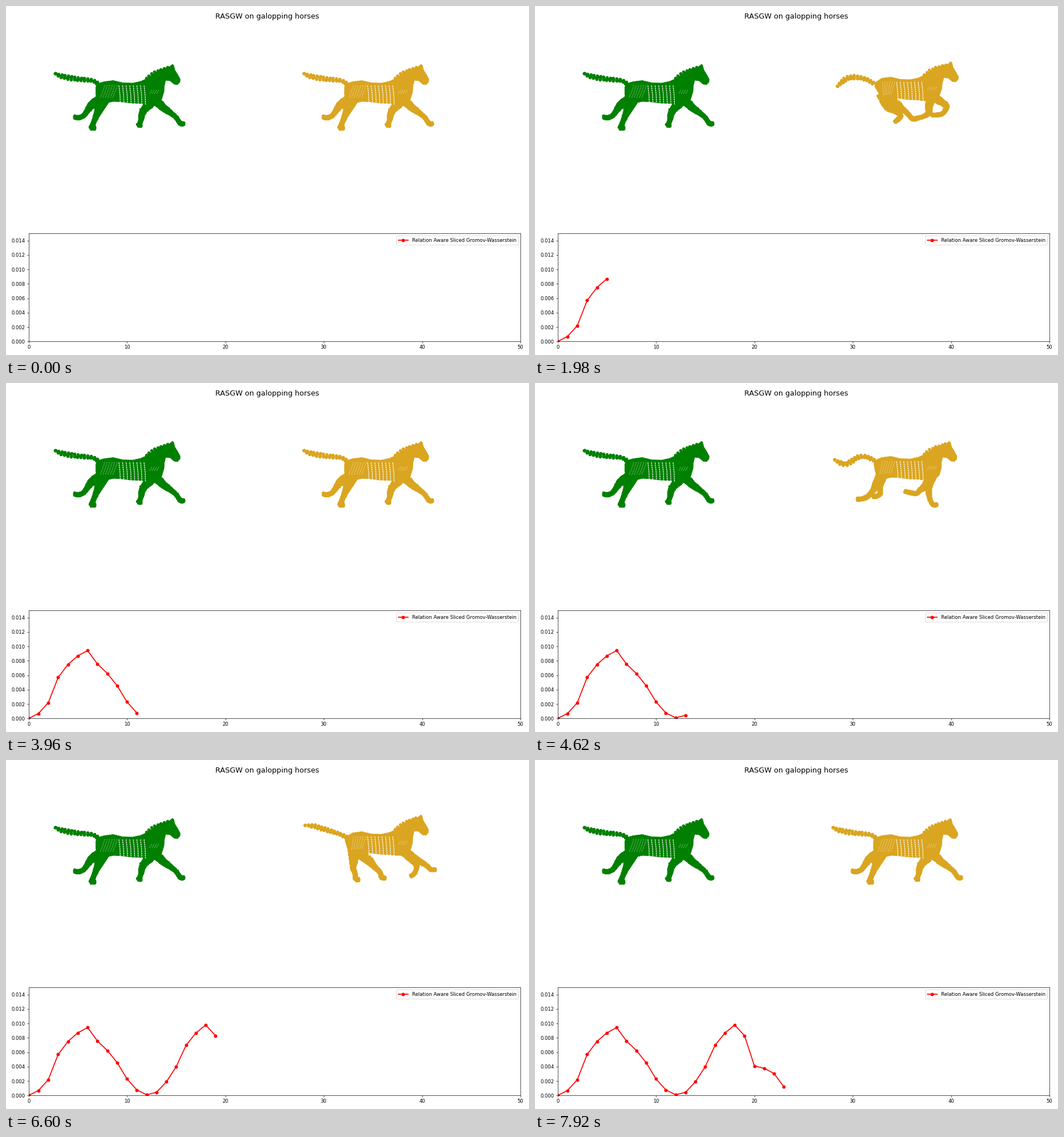
Animation of 917x611 px, one loop 8 s. Source, as a matplotlib script:

```python
import numpy as np
import matplotlib.pyplot as plt
from matplotlib.animation import FuncAnimation

W, H, DPI = 917, 611, 61.13
LOOP, TICK, HOLD = 8000, 20, 330
DOT = 5.5          # dot diameter in pixels
SHIFT = 436        # distance between the two horses
PT = 72 / DPI      # points per pixel

# Each pose: (body dy, head dx, head dy, rump tuck), tail, then
# both hind and both front legs from stifle or elbow to hoof tip.
POSES = {
    "A": [(0, 0, 0, 0),
          (522.5, 118, 531, 122, 545, 125, 558, 127, 572, 128.5, 587, 130, 600, 137),
          (588, 171, 578, 183, 571, 192, 563, 195, 556, 194),
          (599, 180, 593, 194, 588, 206, 585, 213, 592, 213),
          (677, 182, 673, 194, 671, 203, 668, 208, 674, 209),
          (711, 177, 723, 186, 734, 195, 741, 205, 748, 206)],
    "B": [(-4, -1, -2, .5),
          (528, 138, 540, 141, 552, 137, 561, 129, 573, 124.5, 585, 129, 597, 137),
          (618, 172, 628, 180, 636, 187, 633, 195, 629, 199),
          (601, 176, 599, 188, 596, 199, 590, 204, 580, 205),
          (697, 176, 701, 184, 692, 192, 684, 196, 671, 192),
          (677, 178, 667, 188, 658, 198, 650, 203, 642, 204)],
    "C": [(-6, 1, -4.5, 1),
          (530, 140, 537, 133, 547, 126, 558, 124, 570, 125, 583, 129, 596, 137),
          (632, 170, 644, 180, 654, 189, 660, 196, 668, 198),
          (618, 175, 630, 183, 641, 191, 636, 198, 631, 202),
          (711, 167, 721, 175, 715, 187, 706, 190, 694, 190),
          (690, 176, 690, 187, 680, 193, 670, 196, 661, 198)],
    "D": [(-2, -1.5, 0, .3),
          (525, 134, 534, 139, 545, 142, 555, 136, 567, 129, 581, 129, 596, 136),
          (604, 174, 604, 184, 605, 193, 600, 197, 592, 199),
          (599, 176, 592, 188, 584, 197, 575, 202, 564, 203),
          (684, 179, 676, 186, 668, 193, 660, 192, 647, 189),
          (690, 180, 690, 192, 692, 203, 697, 212, 705, 213)],
    "E": [(-5, -.5, -6, .5),
          (524, 114, 538, 115, 548, 118, 559, 121, 572, 125, 584, 129, 597, 135),
          (609, 176, 608, 188, 612, 200, 613, 208, 620, 209),
          (636, 176, 646, 187, 656, 197, 658, 205, 665, 206),
          (716, 172, 728, 179, 738, 185, 744, 191, 753, 192),
          (712, 174, 719, 183, 718, 193, 714, 200, 708, 203)],
    "F": [(0, 1, 0, .2),
          (524, 121, 534, 124, 545, 126, 558, 125, 572, 125, 584, 129, 597, 139),
          (602, 176, 593, 188, 584, 199, 578, 207, 585, 209),
          (627, 176, 636, 190, 647, 204, 652, 213, 660, 216),
          (712, 177, 722, 186, 731, 195, 735, 202, 743, 203),
          (720, 173, 734, 180, 746, 187, 753, 195, 761, 196)],
}
POSES = {k: np.concatenate(v).astype(float) for k, v in POSES.items()}
POSES["G"] = (POSES["A"] + POSES["E"] + POSES["F"]) / 3

KEY_STEPS = np.array([0, 2, 3, 6, 8, 10, 12, 14, 15, 18, 20, 22, 24.])
KEY_POSES = np.array([POSES[k] for k in "ADBCEFADBCEGA"])

BODY = np.array([
    (596, 136), (608, 132.5), (624, 130.5), (641, 134.5), (658, 135), (672, 132),
    (681, 128), (690, 122), (700, 115), (712, 110), (722, 107), (728, 102),
    (730, 104), (732, 112), (737, 120), (741.3, 128), (741, 133), (737, 137.5),
    (731, 137), (724, 131), (716, 130), (713.5, 140), (713, 150), (709, 163),
    (700, 172), (682, 172), (670, 170.5), (655, 170), (640, 168), (625, 167),
    (610, 170), (597, 168), (593.5, 155), (593.5, 142)])
MANE = np.array([(682, 126), (690, 119), (700, 113.5), (712, 109.5), (724, 105.5)])
TAIL_W = [3, 5, 5.4, 5.4, 5, 4.6, 4.6]
HIND_W = [11, 8, 5.5, 4.7, 4.7, 4.3]
FORE_W = [9, 7, 5.5, 4.5, 4.5, 4.2]

LOSS = [0, .0007, .0022, .0057, .0075, .0087, .00943, .00755, .00625, .00455,
        .0023, .00078, .0001, .00045, .0019, .004, .00697, .00867, .00978,
        .0083, .0041, .00378, .00305, .0012]


def spline(knots, vals, t):
    """Cubic Hermite curve through vals (one row per knot)."""
    vals, t = np.asarray(vals, float), np.atleast_1d(t)
    slope = np.gradient(vals, knots, axis=0)
    i = np.clip(np.searchsorted(knots, t, "right") - 1, 0, len(knots) - 2)
    h = (knots[i + 1] - knots[i])[:, None]
    s = (t - knots[i])[:, None] / h
    return ((1 + 2 * s) * (1 - s) ** 2 * vals[i] + s * (1 - s) ** 2 * h * slope[i]
            + s * s * (3 - 2 * s) * vals[i + 1] + s * s * (s - 1) * h * slope[i + 1])


def even(ctrl, gap):
    """Points at equal distances along a smooth curve through ctrl."""
    knots = np.arange(len(ctrl), dtype=float)
    t = np.linspace(0, knots[-1], 90)
    p = spline(knots, ctrl, t)
    dist = np.r_[0, np.cumsum(np.hypot(*np.diff(p[:, :2], axis=0).T))]
    return spline(knots, ctrl, np.interp(np.arange(0, dist[-1], gap), dist, t))


def tube(ctrl, widths, gap):
    """Rings of dots across a limb."""
    p = even(np.column_stack([ctrl, widths]), gap)
    d = np.gradient(p[:, :2], axis=0)
    d /= np.hypot(d[:, 0], d[:, 1])[:, None] + 1e-9
    normal = np.column_stack([-d[:, 1], d[:, 0]])
    reach = np.maximum(p[:, 2] - DOT / 2, .2)
    rings = [p[:, :2] + normal * (reach * f)[:, None] for f in np.linspace(-1, 1, 7)]
    return np.vstack(rings)


def warp(pts, move):
    """Shift body and head and tuck the rump."""
    dy, hx, hy, tuck = move
    x, y = np.asarray(pts, float).T
    head = np.clip((x - 684) / 38, 0, 1) * np.clip((160 - y) / 25, 0, 1)
    rise = np.clip((x - 592) / 15, 0, 1)
    lean = np.clip((625 - x) / 32, 0, 1) * np.clip((y - 138) / 30, 0, 1)
    return np.column_stack([x + head * hx + 18 * tuck * lean,
                            y + (1 - head) * rise * dy + head * hy])


def strokes(starts, ends):
    """Separate straight strokes joined by gaps."""
    gap = np.full((len(starts), 2), np.nan)
    mid = (starts + ends) / 2 + (.6, 0)
    return np.stack([starts, mid, ends, gap], 1).reshape(-1, 2)


def column(x, y):
    return np.column_stack([x, np.full(len(x), y)])


rib_x = 634 + 6.3 * np.arange(8)
RIBS = strokes(column(rib_x, 139), column(rib_x + 2.5, 173))
flank_x = 609 + 4.4 * np.arange(6)
chest_x = 688 + 4.0 * np.arange(4)
SPECKS = np.vstack([strokes(column(flank_x, 139), column(flank_x - 8, 161)),
                    strokes(column(chest_x, 153), column(chest_x + 4, 146))])


def build(pose):
    move, tail = pose[:4], pose[4:18].reshape(-1, 2)
    legs = pose[18:].reshape(4, 5, 2)
    dots = [tube(tail, TAIL_W, 5.8), even(warp(MANE, move), 6)]
    for n, leg in enumerate(legs):
        root = (609, 160 + move[0]) if n < 2 else (696, 163 + move[0])
        dots.append(tube(np.vstack([root, leg]), HIND_W if n < 2 else FORE_W, 1.8))
    return np.vstack(dots), warp(BODY, move), warp(RIBS, move), warp(SPECKS, move)


class Horse:
    def __init__(self, ax, color, dx):
        self.dx = dx
        self.body, = ax.fill([0], [0], fc=color, ec=color, lw=1, joinstyle="round")
        self.dots, = ax.plot([], [], "o", color=color, ms=DOT * PT, mew=0, zorder=3)
        self.ribs, = ax.plot([], [], color="white", lw=1.2 * PT, zorder=4,
                             ls=(0, (2.4, .8)))
        self.specks, = ax.plot([], [], color="white", lw=.8 * PT, zorder=4,
                               ls=(0, (1.3, 2)))

    def show(self, pose):
        dots, body, ribs, specks = (p + (self.dx, 0) for p in build(pose))
        self.body.set_xy(body)
        self.dots.set_data(*dots.T)
        self.ribs.set_data(*ribs.T)
        self.specks.set_data(*specks.T)


fig = plt.figure(figsize=((W + .001) / DPI, (H + .001) / DPI), dpi=DPI, facecolor="white")
fig.suptitle("RASGW on galopping horses", fontsize=15)

stage = fig.add_axes([0, 0, 1, 1])
stage.set(xlim=(0, W), ylim=(H, 0))
stage.axis("off")
Horse(stage, "green", -SHIFT).show(POSES["A"])
runner = Horse(stage, "goldenrod", 0)

chart = fig.add_axes([39.7 / W, 1 - 587.4 / H, 862.5 / W, 189.3 / H])
curve, = chart.plot([], [], "o-", color="red", lw=2,
                    label="Relation Aware Sliced Gromov-Wasserstein")
chart.set(xlim=(0, 50), ylim=(0, .015))
chart.legend(loc="upper right")


def update(i):
    step = (i * TICK + TICK // 2) // HOLD
    runner.show(spline(KEY_STEPS, KEY_POSES, step)[0])
    curve.set_data(range(step), LOSS[:step])
    return runner.body, runner.dots, runner.ribs, runner.specks, curve


anim = FuncAnimation(fig, update, frames=LOOP // TICK, interval=TICK,
                     repeat=True, repeat_delay=0, blit=False)
plt.show()
```
